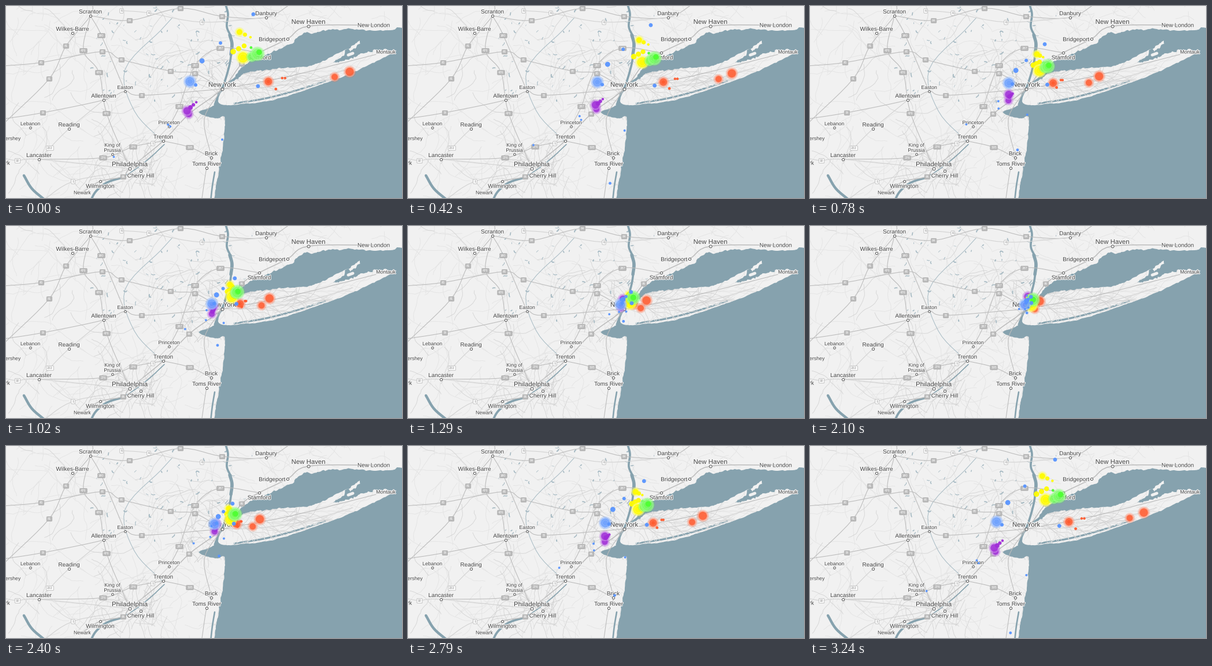
Animation of 685 by 333 pixels, one loop 3270 ms. Source, as a matplotlib script:

```python
import math
import random

import matplotlib.pyplot as plt
import numpy as np
from matplotlib import patheffects
from matplotlib.animation import FuncAnimation
from matplotlib.collections import LineCollection
from matplotlib.patches import Polygon

W, H, DPI = 685, 333, 100
FRAMES, STEP = 109, 30
PX = 72 / DPI
LAND, WATER, LAKE = "#f1f1f1", "#86a2ae", "#a6bac3"
MINOR, ROAD, MAJOR = "#e3e3e3", "#d2d2d2", "#bcbcbc"
rng = random.Random(11)

plt.rcParams["font.family"] = "Liberation Sans"
fig = plt.figure(figsize=(W / DPI, H / DPI), dpi=DPI, facecolor=LAND)
ax = fig.add_axes([0, 0, 1, 1])
ax.set_xlim(0, W)
ax.set_ylim(H, 0)
ax.axis("off")


def smooth(pts, n=6):
    """Catmull-Rom curve through the points."""
    p = np.array(pts, float)
    p = np.vstack([2 * p[0] - p[1], p, 2 * p[-1] - p[-2]])
    out = []
    for a, b, c, d in zip(p, p[1:], p[2:], p[3:]):
        for t in np.arange(n) / n:
            out.append(0.5 * (2 * b + (c - a) * t + (2 * a - 5 * b + 4 * c - d) * t ** 2
                              + (3 * b - a - 3 * c + d) * t ** 3))
    return np.array(out + [p[-2]])


def shore(*pts, rough=0.12):
    """Coast line with midpoint displacement between smoothed key points."""
    line = smooth(pts, 3)
    for _ in range(2):
        fine = [line[0]]
        for a, b in zip(line, line[1:]):
            dx, dy = b - a
            push = rng.gauss(0, rough)
            fine += [(a + b) / 2 + push * np.array([-dy, dx]), b]
        line = np.array(fine)
    return line


def area(*parts, color, z):
    patch = Polygon(np.vstack(parts), closed=True, fc=color, ec="none", zorder=z)
    return ax.add_patch(patch)


def stroke(*pts, color=WATER, lw=1.0, z=3):
    x, y = smooth(pts).T
    ax.plot(x, y, color=color, lw=lw * PX, zorder=z, solid_capstyle="round")


def wander(x, y, heading, steps, size, turn):
    path = [(x, y)]
    for _ in range(steps):
        heading += rng.gauss(0, turn)
        x += size * math.cos(heading)
        y += size * math.sin(heading)
        path.append((x, y))
    return path


def web(count, box, color, z=1, steps=14, tilt=None, clip=None):
    """Small roads wandering from random places in a box."""
    x0, y0, x1, y1 = box
    paths = [wander(rng.uniform(x0, x1), rng.uniform(y0, y1),
                    rng.uniform(0, 6.28) if tilt is None else rng.gauss(tilt, 0.12),
                    steps, 5, 0.22) for _ in range(count)]
    lines = LineCollection(paths, colors=color, linewidths=0.8 * PX, zorder=z)
    ax.add_collection(lines)
    if clip:
        lines.set_clip_path(clip)


# Small roads and lakes
web(230, (0, 0, 520, H), MINOR)
web(35, (0, 0, 400, H), ROAD)
for x, y in [(350, 135), (215, 280)]:
    web(45, (x - 45, y - 45, x + 45, y + 45), ROAD, steps=7)
web(30, (410, 0, 680, 30), MINOR, steps=7)
lakes = [wander(rng.uniform(150, 430), rng.uniform(0, 165), rng.gauss(2.1, 0.5),
                rng.randint(1, 3), 2.2, 0.5) for _ in range(85)]
ax.add_collection(LineCollection(lakes, colors=LAKE, zorder=2, capstyle="round",
                                 linewidths=[rng.uniform(0.6, 2) * PX for _ in lakes]))

# Ocean, sound and island
jersey = shore((360, 340), (363, 312), (371, 272), (377, 222), (378, 192), (366, 195),
               (350, 192), (333, 184), (351, 177), (362, 170), (367, 156), rough=0.05)
sound = shore((392, 128), (407, 107), (426, 95), (456, 83), (489, 67), (516, 46), (530, 48),
              (555, 42), (600, 40), (640, 43), (690, 39))
area(jersey, sound, [(690, 340)], color=WATER, z=3)

north = shore((371, 151), (383, 137), (404, 123), (413, 117), (437, 112), (480, 108),
              (524, 104), (548, 95), (588, 75), (612, 60))
forks = shore((612, 63), (596, 79), (566, 98), (590, 93), (609, 85), (641, 78), (673, 77),
              rough=0.2)
south = shore((672, 80), (640, 96), (600, 115), (560, 131), (520, 145), (480, 158),
              (440, 167), (385, 172), (368, 168), (368, 158), rough=0.04)
island = area(north, forks, south, color=LAND, z=4)
stroke((552, 130), (510, 144), (475, 154), (440, 162), (395, 169), lw=3.2, z=4)
for _ in range(30):
    x = rng.uniform(390, 545)
    y = 168 - (x - 395) * 0.24 + rng.uniform(-2, 2)
    stroke((x, y), (x + rng.uniform(2, 6), y - 1), color=LAND, lw=1.3, z=4)
stroke((592, 85), (600, 82), color=LAND, lw=5, z=4)
web(60, (375, 105, 600, 150), MINOR, 4.5, tilt=-0.12, clip=island)
web(30, (375, 115, 500, 150), ROAD, 4.5, tilt=-0.1, clip=island)
web(30, (370, 120, 540, 165), MINOR, 4.5, 6, 1.5, island)

# Rivers
stroke((380, -2), (384, 14), (382, 36), (389, 54), (390, 75), (387, 100), (378, 132),
       (369, 154), lw=3.6)
stroke((387, 50), (391, 66), (389, 84), lw=5.5)
stroke((369, 152), (362, 171), lw=5)
stroke((396, 125), (382, 135), (373, 149), lw=1.8)
stroke((274, 240), (246, 266), (215, 289), (190, 301), lw=1.6)
stroke((203, 297), (175, 306), (156, 321), (146, 338), lw=3.8)
stroke((31, 294), (45, 317), (68, 337), lw=4.5)
stroke((361, 288), (357, 312), (354, 338), lw=2.6)
stroke((272, 236), (222, 182), (206, 110), (268, 42), (288, 20), color=LAKE)

# Towns: name, x, y, font size, where the label stands
BIG, MID, SMALL = 11.4, 10, 8.8
TOWNS = [
    ("Scranton", 146, 17, MID, "above"), ("Wilkes-Barre", 115, 47, MID, "above"),
    ("Danbury", 450, 20, MID, "above"), ("New Haven", 523, 35, BIG, "above"),
    ("New London", 636, 33, MID, "on"), ("Bridgeport", 487, 57, MID, "left"),
    ("Stamford", 438, 81, MID, "below"), ("Montauk", 657, 79, SMALL, "on"),
    ("Easton", 206, 148, SMALL, "above"), ("Allentown", 169, 163, MID, "above"),
    ("New York", 374, 144, BIG, "above"), ("Princeton", 282, 209, SMALL, "above"),
    ("Lebanon", 42, 211, SMALL, "above"), ("Reading", 109, 213, MID, "above"),
    ("Hershey", 9, 229, SMALL, "on"), ("King of\nPrussia", 184, 257, SMALL, "above"),
    ("Trenton", 272, 234, MID, "above"), ("Brick", 355, 263, MID, "above"),
    ("Lancaster", 57, 266, MID, "above"), ("Philadelphia", 214, 282, BIG, "above"),
    ("Toms River", 347, 281, MID, "above"), ("Cherry Hill", 233, 286, MID, "below"),
    ("Wilmington", 163, 304, MID, "below"), ("Newark", 132, 323, SMALL, "on"),
    ("York", -3, 272, MID, "on"),
]
SIDES = {"above": (0, -4, "center"), "below": (0, 11.5, "center"),
         "left": (-4, 4, "right"), "on": (0, 3.5, "center")}
glow = [patheffects.withStroke(linewidth=1.6, foreground="#f6f6f6")]
places = {}
for name, x, y, size, side in TOWNS:
    places[name] = (x, y)
    dx, dy, ha = SIDES[side]
    ax.text(x + dx, y + dy, name, size=size * PX, color="#444444", ha=ha, va="baseline",
            linespacing=1.0, zorder=8, path_effects=glow)
    if side != "on":
        ax.scatter(x, y, s=(0.42 * size * PX) ** 2, fc="white", ec="#555555", lw=0.7, zorder=7)


def route(number, *stops, color=MAJOR, lw=1.1):
    """Road through towns and junctions; junctions carry the number."""
    stroke(*[places.get(s, s) for s in stops], color=color, lw=lw, z=5)
    fc, tc = ("#b8b8b8", "white") if color == MAJOR else ("#fafafa", "#8a8a8a")
    for stop in stops:
        if number and stop not in places and 0 < stop[0] < W and 0 < stop[1] < H:
            ax.text(*stop, number, size=5.8 * PX, color=tc, ha="center",
                    va="center_baseline", zorder=6,
                    bbox=dict(boxstyle="round,pad=0.28", fc=fc, ec="#b4b4b4", lw=0.5))


route("95", "Newark", "Wilmington", (203, 296), "Philadelphia", "Trenton", (317, 187),
      "New York", (408, 100), "Stamford", "Bridgeport", "New Haven", "New London", lw=1.5)
route("80", (-5, 104), (61, 98), (167, 79), (200, 93), (285, 113), (327, 117), "New York")
route("78", (-5, 196), (64, 185), "Allentown", "Easton", (235, 155), "New York")
route("81", (150, -5), "Scranton", (104, 69), (75, 126), (-5, 205))
route("476", "Scranton", (134, 77), (161, 115), (174, 186), "Philadelphia")
route("84", "Scranton", (214, 25), (302, 4), (374, 18), "Danbury", (495, -5))
route("287", "Princeton", (300, 174), (327, 103), (371, 73), "Stamford")
route("276", "Lancaster", (168, 263), (220, 244), "Trenton")
route("195", "Trenton", (318, 245), "Brick")
route("380", "Scranton", (165, 51), "Easton")
route("", "New York", (343, 196), "Brick", "Toms River", (338, 340))
route("", "New York", (480, 124), (562, 104), (640, 84))
route("", "New York", (440, 142), (520, 130), (600, 107), color=ROAD)
route("6", (200, 8), (247, 12), (339, 28), "Danbury", color=ROAD)
route("222", "Lancaster", (76, 246), "Reading", "Allentown", color=ROAD)
route("30", (-5, 264), (20, 268), "Lancaster", "Philadelphia", color=ROAD)
route("1", (60, 340), (116, 304), "Philadelphia", (254, 238), "Princeton", color=ROAD)

# Travellers
HOME = (378, 133)


def dot(start, r, end=HOME):
    return [(*start, *end, r)]


def trail(a, b, n, r0, r1, end=HOME):
    """Dots spaced evenly from a to b, with radius going from r0 to r1."""
    xs, ys, rs = (np.linspace(*ends, n) for ends in (*zip(a, b), (r0, r1)))
    return [(x, y, *end, r) for x, y, r in zip(xs, ys, rs)]


class Swarm:
    """Discs of one colour; the large ones have speckled halos."""

    def __init__(self, dots, rgb, z, core=0.85):
        data = np.array(dots, float)
        self.start, self.end = data[:, :2], data[:, 2:4]
        self.owner, self.local, self.radius, self.color = [], [], [], []
        rgb = np.array(rgb) / 255
        for i, r in enumerate(data[:, 4]):
            if r < 5:
                self.put(i, 0, 0, r, rgb, 0.95)
                continue
            self.put(i, 0, 0, r + 2.2, 0.5 + rgb / 2, 0.65)
            self.put(i, 0, 0, r, rgb, core)
            self.ring(i, r + 1, rgb, 0.55)
            self.ring(i, r + 2.9, rgb, 0.5)
            if r >= 8:
                self.ring(i, r - 0.6, np.ones(3), 0.4)
                self.ring(i, r - 3, np.ones(3), 0.4)
        self.local = np.array(self.local)
        self.art = ax.scatter(*self.place(1).T, s=(2 * PX * np.array(self.radius)) ** 2,
                              c=self.color, lw=0, zorder=z)

    def put(self, i, x, y, r, rgb, alpha):
        self.owner.append(i)
        self.local.append((x, y))
        self.radius.append(r)
        self.color.append((*rgb, alpha))

    def ring(self, i, radius, rgb, alpha):
        n = int(2 * math.pi * radius / 2.3)
        for k in range(n):
            a = 2 * math.pi * k / n
            self.put(i, radius * math.cos(a), radius * math.sin(a), 0.6, rgb, alpha)

    def place(self, spread):
        pos = self.end + (self.start - self.end) * spread
        return pos[self.owner] + self.local

    def move(self, spread):
        self.art.set_offsets(self.place(spread))


purple = (dot((316, 188), 5.2) + dot((313, 182), 6.5, (383, 117))
          + trail((319, 176), (329, 167), 3, 4, 2.2))
orange = (dot((595, 114), 7.2, (379, 132)) + dot((569, 123), 5.5, (372, 146))
          + dot((454, 131), 6.5, (378, 137)) + dot((454, 131), 3, (378, 137))
          + dot((467, 144), 2.4, (375, 138)) + trail((478, 125), (483, 125), 2, 2.2, 2.2))
yellow = (trail((404, 45), (423, 54), 3, 5, 2.2) + trail((393, 79), (412, 69), 3, 4.8, 4.2)
          + dot((410, 89), 9, (380, 142)))
green = (dot((424, 72), 2.4) + trail((425, 88), (435, 83), 2, 6.5, 9.5, (381, 132))
         + dot((438, 80), 4.8, (381, 132)))
blue = (dot((318, 131), 8, (377, 137)) + trail((371, 64), (339, 95), 2, 3, 4.4)
        + dot((328, 137), 3) + dot((428, 14), 3.4) + dot((436, 139), 3.4)
        + dot((280, 206), 2, (384, 113)) + dot((284, 209), 1.9, (380, 138))
        + trail((186, 262), (374, 232), 2, 1.9, 2) + dot((344, 341), 2.4))

swarms = [
    Swarm(purple, (160, 45, 215), 10),
    Swarm(orange, (255, 92, 48), 11),
    Swarm(yellow, (255, 252, 0), 12, 0.95),
    Swarm(green, (78, 255, 50), 13, 0.5),
    Swarm(blue, (88, 148, 255), 14, 0.75),
]


def update(frame):
    t = frame * STEP / 1000
    spread = (1 + math.cos(0.1 + 1.73 * t)) / 2
    for swarm in swarms:
        swarm.move(spread)
    return [swarm.art for swarm in swarms]


anim = FuncAnimation(fig, update, frames=FRAMES, interval=STEP, repeat=True,
                     repeat_delay=0, blit=False)
plt.show()
```
